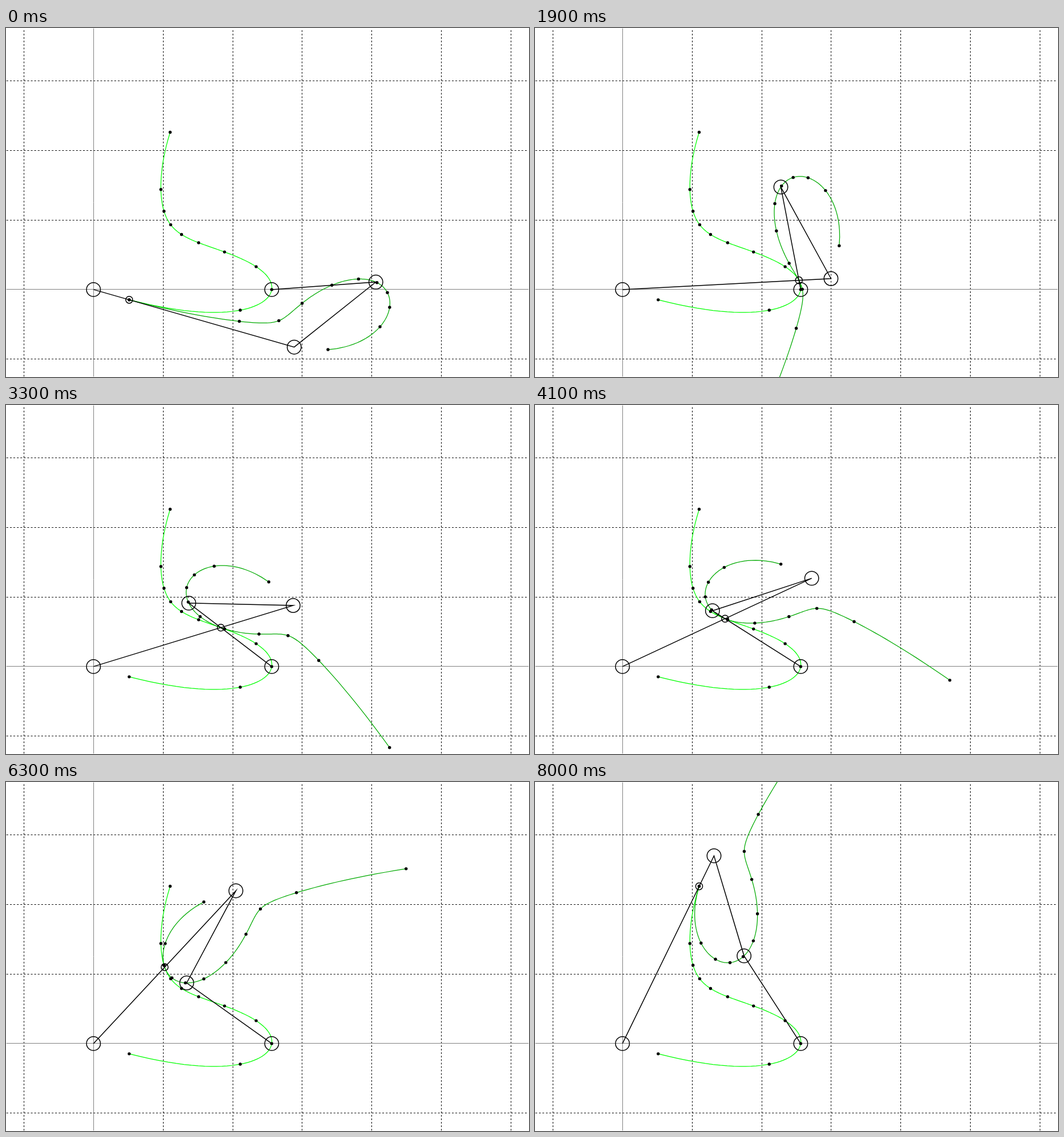
Write an HTML page with a canvas that moves like this. It is 916x611 px and loops after 8.1 s.

```html
<!DOCTYPE html>
<html>
<head>
<meta charset="utf-8">
<title>Four-bar linkage centrodes</title>
<style>
html, body { margin: 0; height: 100%; overflow: hidden; background: #fff; }
canvas { display: block; }
</style>
</head>
<body>
<canvas id="stage" width="916" height="611"></canvas>
<script>
const ctx = document.getElementById('stage').getContext('2d');
const UNIT = 121.9, FIRST = -16, LAST = 64, STEP_MS = 100;
const CRANK = 3 * UNIT, ROD = 1.5 * UNIT;
const A = [153.2, 457.9], D = [A[0] + 2.561 * UNIT, A[1]];
const LEFT = A[0] - 1.25 * UNIT, BOTTOM = A[1] + 1.25 * UNIT;
const RIGHT = LEFT + 7.5 * UNIT, TOP = BOTTOM - 5 * UNIT;

// Joint positions, instant centre and coupler angle for a crank angle in degrees
function pose(deg) {
  const a = deg * Math.PI / 180, ux = Math.cos(a), uy = -Math.sin(a);
  const B = [A[0] + CRANK * ux, A[1] + CRANK * uy];
  const dx = B[0] - D[0], dy = B[1] - D[1], dist = Math.hypot(dx, dy);
  const h = Math.sqrt(ROD * ROD - dist * dist / 4) / dist;
  const C = [D[0] + dx / 2 + h * dy, D[1] + dy / 2 - h * dx];
  const cx = C[0] - D[0], cy = C[1] - D[1];
  const r = (D[0] - A[0]) * cy / (ux * cy - uy * cx);
  const P = [A[0] + r * ux, A[1] + r * uy];
  return { B, C, P, phi: Math.atan2(C[1] - B[1], C[0] - B[0]) };
}

function rotate([x, y], a) {
  const c = Math.cos(a), s = Math.sin(a);
  return [x * c - y * s, x * s + y * c];
}

// Instant centre in the ground frame and in the coupler frame, every half degree
const fixed = [], moving = [];
for (let deg = FIRST; deg <= LAST; deg += 0.5) {
  const { B, P, phi } = pose(deg);
  fixed.push(P);
  moving.push(rotate([P[0] - B[0], P[1] - B[1]], -phi));
}

function line(points, color, width, dash = []) {
  ctx.beginPath();
  for (const p of points) ctx.lineTo(...p);
  ctx.strokeStyle = color;
  ctx.lineWidth = width;
  ctx.setLineDash(dash);
  ctx.stroke();
}

function ring([x, y], radius) {
  ctx.beginPath();
  ctx.arc(x, y, radius, 0, 7);
  ctx.strokeStyle = '#000';
  ctx.lineWidth = 1.5;
  ctx.stroke();
}

function dots(points) {
  ctx.fillStyle = '#000';
  for (let i = 0; i < points.length; i += 16) {
    ctx.beginPath();
    ctx.arc(...points[i], 2.7, 0, 7);
    ctx.fill();
  }
}

// Grid lines sit on whole pixels
const snap = v => Math.floor(v) + 0.5;

function grid() {
  const dash = [UNIT / 40, UNIT / 40];
  const rule = (from, to, i) => line([from, to], i ? '#000' : '#808080', 1, i ? dash : []);
  for (let i = -1; i <= 6; i++) {
    const x = snap(A[0] + i * UNIT);
    rule([x, BOTTOM], [x, TOP], i);
  }
  for (let i = -1; i <= 3; i++) {
    const y = snap(A[1] - i * UNIT);
    rule([LEFT, y], [RIGHT, y], i);
  }
}

function draw(deg) {
  const { B, C, P, phi } = pose(deg);
  const rolled = moving.map(p => {
    const [x, y] = rotate(p, phi);
    return [B[0] + x, B[1] + y];
  });
  ctx.clearRect(0, 0, 916, 611);
  grid();
  line(fixed, '#0f0', 1.25);
  line(rolled, '#0a0', 1.25);
  dots(fixed);
  dots(rolled);
  line([A, B, C, D], '#000', 1.5);
  for (const joint of [A, B, C, D]) ring(joint, UNIT / 10);
  ring(P, UNIT / 20);
}

const start = performance.now();
function tick(now) {
  const step = Math.floor(Math.max(0, now - start) / STEP_MS);
  draw(FIRST + step % (LAST - FIRST + 1));
  requestAnimationFrame(tick);
}
tick(start);
</script>
</body>
</html>
```
